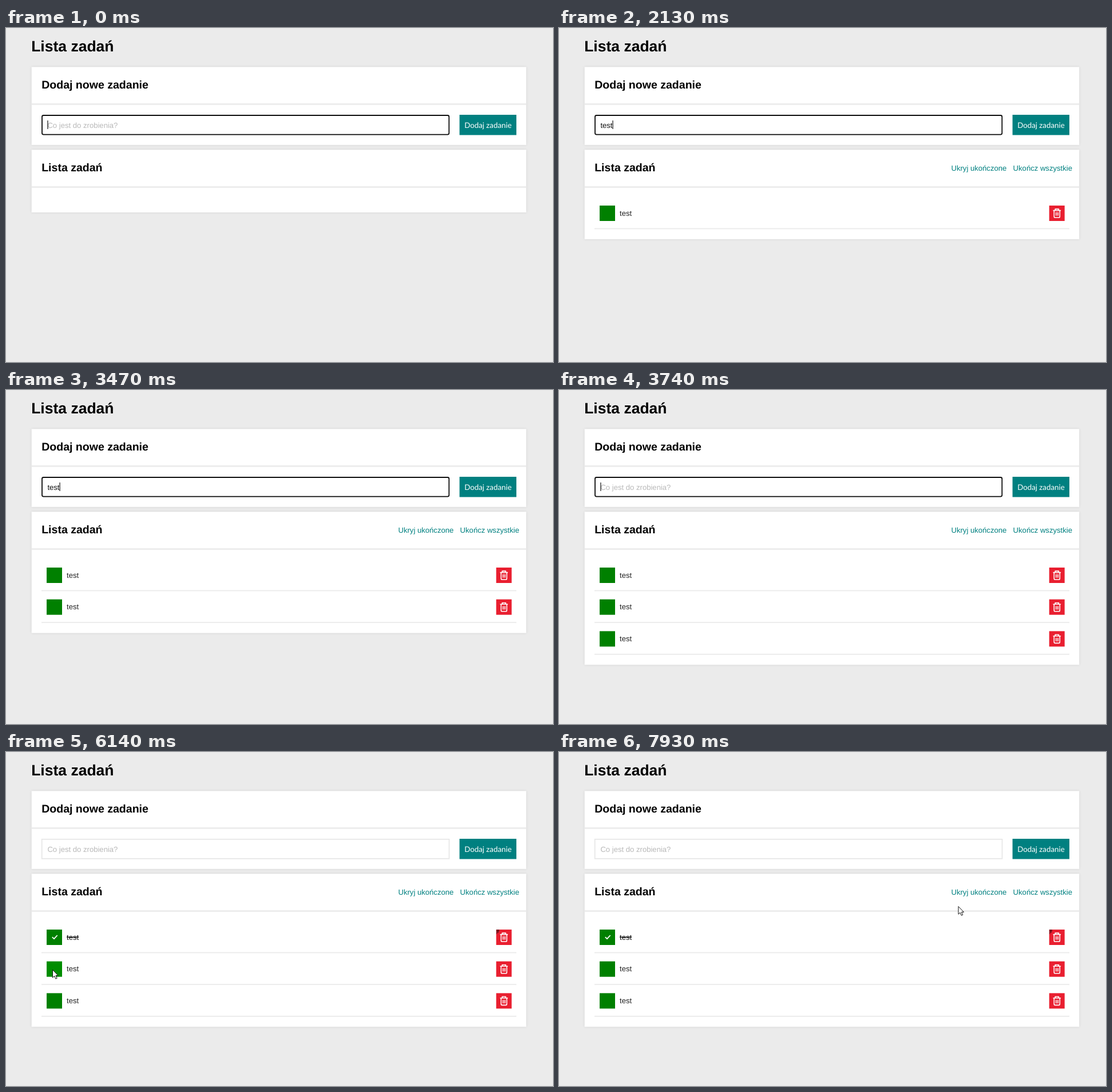
Write an HTML page that moves like this. It is 956x585 px and loops after 8000 ms.

```html
<!DOCTYPE html>
<html lang="pl">
<head>
<meta charset="utf-8">
<title>Lista zadań</title>
<style>
html, body { margin: 0; width: 100%; height: 100%; overflow: hidden; background: #ebebeb; }
svg { display: block; font: 13.1px "Liberation Sans", Arial, sans-serif; text-rendering: geometricPrecision; }
.card { fill: #fff; filter: drop-shadow(0 0 2px rgba(0, 0, 0, .1)); }
.rule { fill: #ebebeb; }
h1, .h1 { font-size: 26.5px; font-weight: bold; }
.h2 { font-size: 19.55px; font-weight: bold; }
.link { fill: #008080; }
.button { font: 13.3px Lato, sans-serif; fill: #fff; text-anchor: middle; }
.item { fill: #222; }
.done { fill: #111; text-decoration: line-through; }
.icon { fill: none; stroke: #fff; stroke-width: 1.6; stroke-linejoin: round; }
.tick { fill: none; stroke: #fff; stroke-width: 1.7; }
</style>
</head>
<body>
<svg width="956" height="585" viewBox="0 0 956 585">
  <text class="h1" x="44.2" y="41">Lista zadań</text>

  <rect class="card" x="44.7" y="68.3" width="864.5" height="136.5"/>
  <rect class="rule" x="44.7" y="132" width="864.5" height="2.7"/>
  <text class="h2" x="62.2" y="106.3">Dodaj nowe zadanie</text>
  <rect id="field" fill="#fff"/>
  <text id="entry" x="72.4" y="174.5"></text>
  <rect id="caret" y="162" width="1.1" height="15"/>
  <rect x="792.6" y="152" width="99.4" height="35.5" fill="#008080"/>
  <text class="button" x="842.4" y="174.6">Dodaj zadanie</text>

  <rect id="list" class="card" x="44.7" y="213.3" width="864.5"/>
  <rect class="rule" x="44.7" y="277.2" width="864.5" height="2.7"/>
  <text class="h2" x="62.2" y="251.3">Lista zadań</text>
  <g id="links" class="link">
    <text x="685.5" y="249.7">Ukryj ukończone</text>
    <text x="793.6" y="249.7">Ukończ wszystkie</text>
  </g>
  <g id="rows"></g>
  <path id="smudge" d="M857 311h5v3l-1 1v2l-2-1-1 3h-1z" fill="#7c1620"/>
  <path id="arrow" d="M.5 .5V14.2L3.6 11.3 5.8 16.3 8.1 15.3 6 10.4H10Z" fill="#fff" stroke="#111" stroke-linejoin="round"/>
</svg>
<script>
const LOOP = 8000, STEP = 70, PITCH = 55.7;
const $ = id => document.getElementById(id);
const show = (el, on) => el.setAttribute('visibility', on ? 'visible' : 'hidden');
const set = (el, attrs) => { for (const k in attrs) el.setAttribute(k, attrs[k]); };

$('rows').innerHTML = [0, 1, 2].map(i => `
  <g transform="translate(0 ${i * PITCH})">
    <rect class="box" x="71" y="311" width="27" height="27"/>
    <path class="tick" d="M80.8 324.2l3.2 3 5.7-6.2"/>
    <text class="item" x="106" y="328.5">test</text>
    <rect x="856.7" y="311" width="27" height="27" fill="#e91f30"/>
    <path class="icon" d="M863.5 319.6h13.6M867.2 319.4v-2.3h6.2v2.3M865.3 319.8v10.4q0 1.8 1.8 1.8h6.4q1.8 0 1.8-1.8v-10.4M868.8 322.8v6M871.9 322.8v6"/>
    <rect class="rule" x="62" y="350.5" width="830" height="1.9"/>
  </g>`).join('');
const rows = [...$('rows').children];

// [time, typed text, caret visible, row count]
const typing = [
  [0, '', 1, 0], [130, '', 0, 0], [330, 't', 1, 0], [460, 'te', 1, 0], [660, 'tes', 1, 0], [940, 'test', 1, 0],
  [1210, '', 1, 1], [1470, '', 0, 1], [1600, 't', 1, 1], [1800, 'te', 1, 1], [1930, 'tes', 1, 1], [2130, 'test', 1, 1],
  [2400, '', 1, 2], [2670, '', 0, 2], [2870, 't', 1, 2], [3070, 'te', 1, 2], [3270, 'tes', 1, 2], [3470, 'test', 1, 2],
  [3740, '', 1, 3], [4000, '', 0, 3], [4530, '', 1, 3], [5080, '', 0, 3]
];
const BLUR = 5640, CHECK = 5710, ENTER = 4530;

// pointer stops: [time, x, y]
const path = [
  [4530, 853, 303], [4660, 790, 309], [4800, 520, 313], [4940, 265, 307], [5010, 202.5, 304],
  [5150, 135, 306], [5290, 88, 311], [5430, 76, 328], [5640, 76, 328], [5780, 77, 333],
  [5990, 80, 370], [6130, 81, 381], [6200, 81, 381], [6410, 83, 377], [6610, 82, 373],
  [6750, 82, 373], [7030, 97, 362], [7310, 160, 332], [7590, 277, 298], [7800, 560, 278], [7940, 697.5, 270]
];

// the pointer was sampled at a fixed rate within each stretch of movement
function sampled(t) {
  const start = [6820, 5640, 4660, ENTER].find(s => t >= s);
  return start + Math.floor((t - start) / STEP + .15) * STEP;
}

function pointer(t) {
  const q = sampled(t);
  const i = path.findIndex(p => p[0] > q);
  if (i < 0) return path[path.length - 1].slice(1);
  const a = path[Math.max(i - 1, 0)], b = path[i];
  const u = Math.max(0, (q - a[0]) / (b[0] - a[0]));
  return [a[1] + (b[1] - a[1]) * u, a[2] + (b[2] - a[2]) * u];
}

function draw(t) {
  const [, text, blink, count] = typing.filter(s => s[0] <= t).pop();
  const focus = t < BLUR;
  set($('field'), focus
    ? { x: 63, y: 153, width: 711.3, height: 33.6, rx: 2.5, stroke: '#0c0c0c', 'stroke-width': 1.8 }
    : { x: 62.7, y: 152.8, width: 711.8, height: 34, rx: 0, stroke: '#e6e6e6', 'stroke-width': 1.7 });

  const entry = $('entry');
  entry.textContent = text || 'Co jest do zrobienia?';
  entry.setAttribute('fill', text ? '#111' : '#b9b9b9');
  $('caret').setAttribute('x', 72.4 + (text ? entry.getComputedTextLength() : 0));
  show($('caret'), focus && blink);

  $('list').setAttribute('height', count ? 100.9 + count * PITCH : 109.7);
  show($('links'), count);

  const moving = t >= ENTER;
  const [x, y] = moving ? pointer(t) : [0, 0];
  rows.forEach((row, i) => {
    const done = i === 0 && t >= CHECK;
    const top = 311 + i * PITCH;
    const hover = x >= 71 && x <= 98 && y >= top && y <= top + 27;
    row.setAttribute('display', i < count ? 'inline' : 'none');
    row.querySelector('.box').setAttribute('fill', hover ? '#008d00' : '#008000');
    row.querySelector('.tick').setAttribute('display', done ? 'inline' : 'none');
    row.querySelector('.item').classList.toggle('done', done);
  });
  show($('smudge'), t >= 4660);
  show($('arrow'), moving);
  $('arrow').setAttribute('transform', `translate(${x} ${y})`);
}

function tick() {
  draw(performance.now() % LOOP);
  requestAnimationFrame(tick);
}
tick();
</script>
</body>
</html>
```
